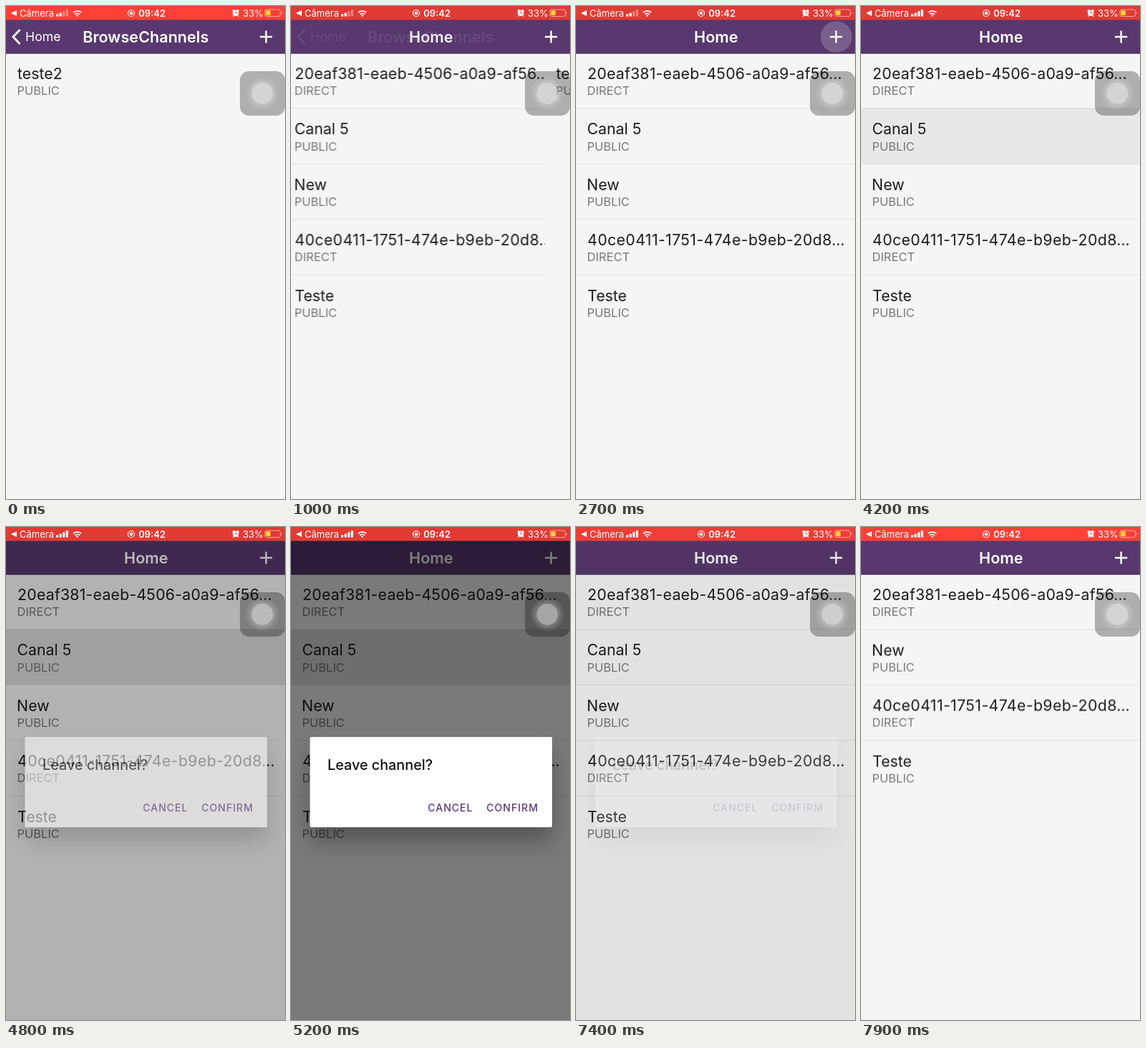
An HTML page for the animation above (8000 ms loop, 390 by 688 pixels).

```html
<!DOCTYPE html>
<html lang="en">
<head>
<meta charset="utf-8">
<title>Channels</title>
<style>
  html, body { margin: 0; width: 100%; height: 100%; overflow: hidden; background: #f5f5f5; }
  svg { display: block; width: 100vw; height: 100vh; font-family: Inter, "Liberation Sans", sans-serif; }

  .name { font-size: 21.3px; fill: #1c1c1c; }
  .id { letter-spacing: .2px; }
  .wide { letter-spacing: .37px; }
  .kind { font-size: 16.5px; fill: #787878; }
  .rule { fill: #e1e1e1; }
  .title { font-size: 21.6px; font-weight: 600; fill: #fff; text-anchor: middle; }
  .back { font-size: 17.7px; fill: #fff; }
  .status { font-size: 13px; fill: #fff; }
  .clock { font-weight: 600; }
  .ask { font-size: 19.8px; font-weight: 500; fill: #111; }
  .action { font-size: 14px; font-weight: 500; letter-spacing: 1.04px; fill: #553971; }
  .card { fill: #fff; filter: drop-shadow(0 20px 15px rgba(0, 0, 0, .29)); }
  .line { fill: none; stroke: #fff; }

  /* every part shares one 8 s timeline */
  .home, .browse, .old, .new, .gone, .up, .press, .ripple, .dim, .ask-box, .bar, .signal {
    animation: 8s linear infinite;
  }
  .home { animation-name: home; }
  .browse { animation-name: browse; }
  .old { animation-name: old; }
  .new { animation-name: new; }
  .gone { animation-name: gone; animation-timing-function: step-end; }
  .up { animation-name: up; animation-timing-function: step-end; }
  .press { animation-name: press; }
  .ripple { animation-name: ripple; }
  .dim, .ask-box { animation-name: modal; }
  .bar { animation-name: bar; }
  .signal { animation-name: signal; animation-timing-function: step-end; }

  @keyframes home {
    0% { transform: translateX(-117px); }
    10% { transform: translateX(-117px); animation-timing-function: cubic-bezier(.2833, .99, .3183, .99); }
    16.25%, 100% { transform: none; }
  }
  @keyframes browse {
    0% { transform: translateX(0); }
    10% { transform: translateX(0); animation-timing-function: cubic-bezier(.2833, .99, .3183, .99); }
    16.25%, 100% { transform: translateX(390px); }
  }
  @keyframes old {
    0% { opacity: 1; }
    10% { opacity: 1; animation-timing-function: cubic-bezier(.2833, .99, .3183, .99); }
    16.25%, 100% { opacity: 0; }
  }
  @keyframes new {
    0% { opacity: 0; }
    10% { opacity: 0; animation-timing-function: cubic-bezier(.2833, .99, .3183, .99); }
    16.25%, 100% { opacity: 1; }
  }
  @keyframes gone {
    0% { opacity: 1; }
    96.25%, 100% { opacity: 0; }
  }
  @keyframes up {
    0% { transform: none; }
    96.25%, 100% { transform: translateY(-77.4px); }
  }
  @keyframes press {
    0%, 51.9% { opacity: 0; }
    53.1%, 65% { opacity: 1; }
    66.2%, 100% { opacity: 0; }
  }
  @keyframes ripple {
    0%, 31.2% { opacity: 0; }
    32.5%, 35% { opacity: 1; }
    38.1%, 100% { opacity: 0; }
  }
  @keyframes modal {
    0%, 58.5% { opacity: 0; }
    61.25%, 90.19% { opacity: 1; }
    92.94%, 100% { opacity: 0; }
  }
  @keyframes bar {
    0%, 6.5% { fill: #fe4036; }
    11.5%, 65% { fill: #e13b34; }
    72.5%, 84% { fill: #fe4036; }
    92.5% { fill: #ee3e36; }
    98%, 100% { fill: #fe4036; }
  }
  @keyframes signal {
    0% { opacity: .38; }
    40%, 100% { opacity: 1; }
  }
</style>
</head>
<body>
<svg viewBox="0 0 390 688" preserveAspectRatio="none">
  <rect width="390" height="688" fill="#f5f5f5"/>

  <g class="home">
    <g>
      <text class="name id" x="16.1" y="102">20eaf381-eaeb-4506-a0a9-af56…</text>
      <text class="kind" x="15.5" y="124.2">DIRECT</text>
      <rect class="rule" y="142.5" width="390" height="1"/>
    </g>
    <g class="gone">
      <rect class="press" y="143" width="390" height="77.4" fill="#000" fill-opacity=".1"/>
      <text class="name" x="15.5" y="179.4">Canal 5</text>
      <text class="kind" x="15.5" y="201.6">PUBLIC</text>
      <rect class="rule" y="219.9" width="390" height="1"/>
    </g>
    <g class="up">
      <text class="name" x="15.1" y="256.8">New</text>
      <text class="kind" x="15.5" y="279">PUBLIC</text>
      <rect class="rule" y="297.3" width="390" height="1"/>
      <text class="name wide" x="16.1" y="334.1">40ce0411-1751-474e-b9eb-20d8…</text>
      <text class="kind" x="15.5" y="356.4">DIRECT</text>
      <rect class="rule" y="374.7" width="390" height="1"/>
      <text class="name" x="16.1" y="411.5">Teste</text>
      <text class="kind" x="15.5" y="433.8">PUBLIC</text>
    </g>
  </g>

  <g class="browse">
    <rect y="66" width="390" height="622" fill="#f5f5f5"/>
    <text class="name" x="16.1" y="102">teste2</text>
    <text class="kind" x="15.5" y="124.2">PUBLIC</text>
  </g>

  <!-- header -->
  <rect y="19" width="390" height="47" fill="#58386e"/>
  <rect y="65.3" width="390" height="1.4" fill="#48345a"/>
  <g class="old">
    <path class="line" d="M19.5 33 10 43l9.5 10" stroke-width="2.8"/>
    <text class="back" x="27" y="49.4">Home</text>
    <text class="title" x="195.3" y="50.6">BrowseChannels</text>
  </g>
  <text class="title new" x="195.8" y="50.6">Home</text>
  <circle class="ripple" cx="363.8" cy="43" r="22" fill="#fff" fill-opacity=".2"/>
  <path class="line" d="M355 43h17.2M363.6 34.4v17.2" stroke-width="2.4"/>

  <!-- dialog -->
  <rect class="dim" y="19" width="390" height="669" fill="#000" fill-opacity=".5"/>
  <g class="ask-box">
    <rect class="card" x="26.5" y="293" width="338.5" height="126" rx="2"/>
    <text class="ask" x="51" y="339.4">Leave channel?</text>
    <text class="action" x="191.2" y="397.4">CANCEL</text>
    <text class="action" x="273.2" y="397.4">CONFIRM</text>
  </g>

  <!-- status bar -->
  <rect class="bar" width="390" height="19.4" fill="#fe4036"/>
  <path d="M7 10l8-4v8z" fill="#fff"/>
  <text class="status" x="19" y="14.6">Câmera</text>
  <g fill="#fff">
    <rect x="70" y="11.2" width="3.2" height="3.3" rx=".6"/>
    <rect x="74.6" y="9.4" width="3.2" height="5.1" rx=".6"/>
    <g class="signal">
      <rect x="79.2" y="7.2" width="3.2" height="7.3" rx=".6"/>
      <rect x="83.8" y="5" width="3.2" height="9.5" rx=".6"/>
    </g>
  </g>
  <g transform="translate(.5)">
    <path class="line" d="M93.5 9.2a8.2 8.2 0 0 1 11.4 0M95.8 11.6a5 5 0 0 1 6.8 0" stroke-width="1.7"/>
    <path d="M97.4 13a2.7 2.7 0 0 1 3.6 0l-1.8 1.9z" fill="#fff"/>
  </g>
  <circle class="line" cx="175" cy="10" r="4.5" stroke-width="1.2"/>
  <circle cx="175" cy="10" r="2.3" fill="#fff"/>
  <text class="status clock" x="185.3" y="14.6">09:42</text>
  <circle cx="321.2" cy="9.8" r="4.3" fill="#fff"/>
  <path class="line" d="M316.6 7.2l2.4-2.2M325.8 7.2l-2.4-2.2M318.3 13.4l-1 1.2M324.1 13.4l1 1.2" stroke-width="1.5"/>
  <path d="M321.2 7.2v2.8h2.2" fill="none" stroke="#f0443a"/>
  <text class="status" x="331" y="14.6">33%</text>
  <rect class="line" x="362" y="4.9" width="21.4" height="9.6" rx="2.4" stroke-opacity=".55"/>
  <rect x="363.4" y="6.3" width="6.4" height="6.8" rx="1" fill="#ffd52e"/>
  <path d="M384.6 8a2 2 0 0 1 0 3.6z" fill="#fff" fill-opacity=".6"/>

  <!-- floating button -->
  <rect x="327" y="91" width="63" height="62" rx="12.5" fill="#000" fill-opacity=".29"/>
  <g fill="#fff">
    <circle cx="358.3" cy="122" r="23" fill-opacity=".08"/>
    <circle cx="358.3" cy="122" r="19" fill-opacity=".11"/>
    <circle cx="358.3" cy="122" r="15" fill-opacity=".35"/>
  </g>
</svg>
</body>
</html>
```
